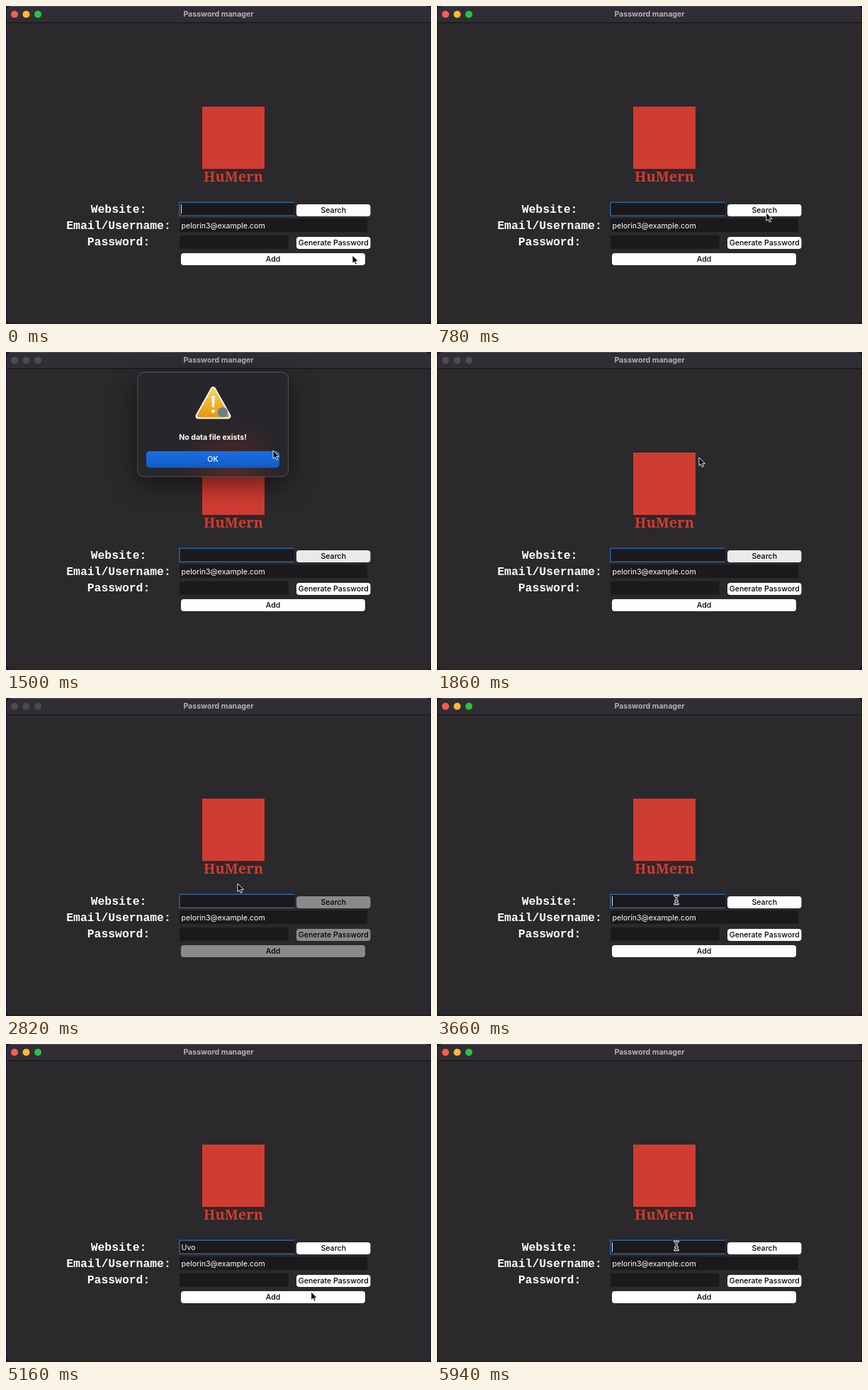
Write an HTML page that moves like this. It is 600x449 px and loops after 6000 ms.

```html
<!DOCTYPE html>
<html lang="en">
<head>
<meta charset="utf-8">
<title>Password manager</title>
<style>
  html, body { margin: 0; width: 100%; height: 100%; overflow: hidden; background: #1b1236; }
  svg { display: block; width: 600px; height: 449px; }
  text { font: 10.6px Inter, sans-serif; fill: #fff; }
  .mid { text-anchor: middle; }
  .bold { font-weight: 700; }
  .label { font: bold 16.4px "Liberation Mono", monospace; text-anchor: middle; }
  .brand { font: 800 20px "Noto Serif", serif; fill: #cf3c32; text-anchor: middle; }
  .field { fill: #1b191b; }
  .btn text { fill: #000; font-weight: 500; text-anchor: middle; }
  .panel { filter: drop-shadow(0 10px 18px rgba(0, 0, 0, .55)); }
</style>
</head>
<body>
<svg viewBox="0 0 600 449">
  <defs>
    <linearGradient id="amber" x2="0" y2="1">
      <stop stop-color="#fad04c"/><stop offset="1" stop-color="#e39a12"/>
    </linearGradient>
    <linearGradient id="blue" x2="0" y2="1">
      <stop stop-color="#1b6ee0"/><stop offset="1" stop-color="#105cc6"/>
    </linearGradient>
    <radialGradient id="glow" gradientUnits="userSpaceOnUse" cx="318" cy="166" r="72">
      <stop stop-color="#a02c26" stop-opacity=".36"/><stop offset="1" stop-color="#a02c26" stop-opacity="0"/>
    </radialGradient>
  </defs>

  <rect x="1" width="598.5" height="448.5" rx="7" fill="#2b292b"/>
  <path d="M1 23V7Q1 0 8 0H592.500Q599.500 0 599.500 7V23Z" fill="#302e34"/>
  <path d="M7 .5H593" stroke="#56545a"/>
  <path d="M1 23.500H599.500" stroke="#131214"/>
  <g id="lights"></g>
  <text class="mid bold" x="300" y="14.800" style="fill:#b3b1b5">Password manager</text>

  <rect x="277" y="142" width="88" height="88" fill="#cf3c32"/>
  <text class="brand" x="321" y="248">HuMern</text>

  <text class="label" x="159" y="292">Website:</text>
  <text class="label" x="159" y="315">Email/Username:</text>
  <text class="label" x="159" y="338">Password:</text>

  <rect class="field" x="245" y="277" width="162" height="19.500"/>
  <path d="M407 277.200H244.800V296.300H407" fill="none" stroke="#2c6298" stroke-width="1.500"/>
  <rect class="field" x="245" y="300" width="265" height="19"/>
  <rect class="field" x="245" y="324" width="153.500" height="18.500"/>
  <text id="site" x="247.500" y="290.800"></text>
  <rect id="caret" y="280" width="1" height="13.500" fill="#e8eef6"/>
  <text x="247.500" y="313.800">pelorin3@example.com</text>
  <g id="buttons"></g>

  <g id="dialog">
    <rect class="panel" x="186" y="28.500" width="212.500" height="147.500" rx="9" fill="#27262a"/>
    <rect x="186" y="28.500" width="212.500" height="147.500" rx="9" fill="url(#glow)" stroke="#5a585d" stroke-width=".9"/>
    <path d="M292.500 53L313.500 90.500H271.500Z" fill="#f1f0ee" stroke="#f1f0ee" stroke-width="8" stroke-linejoin="round"/>
    <path d="M292.500 53.500L312.800 90H272.200Z" fill="url(#amber)" stroke="url(#amber)" stroke-width="4.500" stroke-linejoin="round"/>
    <path d="M290.200 62H294.800L293.800 78H291.200Z" fill="#fff"/>
    <circle cx="292.500" cy="83.500" r="2.300" fill="#fff"/>
    <circle cx="306" cy="85" r="7" fill="#67808e"/>
    <text class="mid bold" x="292" y="124">No data file exists!</text>
    <rect x="198" y="140" width="188" height="23.500" rx="5" fill="url(#blue)"/>
    <text class="mid" x="292" y="155.300" style="font-weight:500">OK</text>
  </g>

  <g id="pointer">
    <path id="arrow" d="M0 0V11.500L2.700 9.100L4.500 13.200L6.500 12.300L4.700 8.400H8.400Z" fill="#000" stroke="#fff" stroke-width=".9" stroke-linejoin="round"/>
    <g id="ibeam" fill="none" stroke-linecap="round">
      <path id="beam" d="M-2.500 -6Q0 -6 0 -4.500Q0 -6 2.500 -6M0 -4.500V4.500M-2.500 6Q0 6 0 4.500Q0 6 2.500 6M-1.500 2H1.500" stroke="#fff" stroke-width="2.800"/>
      <use href="#beam" id="core"/>
      <path d="M-2.500 -6Q0 -6 0 -4.500Q0 -6 2.500 -6M0 -4.500V4.500M-2.500 6Q0 6 0 4.500Q0 6 2.500 6M-1.500 2H1.500" stroke="#000"/>
    </g>
  </g>
</svg>
<script>
const LOOP = 6000, STEP = 60;
const $ = id => document.getElementById(id);

function add(parent, tag, attrs, text = '') {
  const el = document.createElementNS('http://www.w3.org/2000/svg', tag);
  for (const key in attrs) el.setAttribute(key, attrs[key]);
  el.textContent = text;
  parent.append(el);
  return el;
}

function button(label, x, y, width) {
  const g = add($('buttons'), 'g', { class: 'btn' });
  const face = add(g, 'rect', { x, y, width, height: 17, rx: 4 });
  add(g, 'text', { x: x + width / 2, y: y + 12 }, label);
  return face;
}

const LIGHTS = ['#ff5b53', '#fdbb2e', '#27c53f'];
const lights = LIGHTS.map((_, i) => add($('lights'), 'circle', { cx: 12 + 16.5 * i, cy: 11.8, r: 5 }));
const search = button('Search', 410, 280, 104.5);
const others = [button('Generate Password', 410, 326, 104.5), button('Add', 247, 349, 260)];
$('core').remove();

// time, x, y
const PATH = [
  [120, 489, 352], [420, 482, 322], [720, 465, 292], [1080, 464, 292], [1260, 424, 210],
  [1500, 377, 139], [1620, 370, 149], [1920, 370, 149], [2340, 348, 210], [2700, 328, 258],
  [2820, 327, 262], [3120, 338, 282], [3360, 338, 285], [4140, 338, 285], [4320, 420, 306],
  [4440, 465, 323], [4680, 463, 334], [5040, 440, 346], [5340, 417, 356], [5400, 417, 356],
  [5640, 366, 309], [5820, 338, 285]
];
// time, scale, opacity
const DIALOG = [
  [900, 1.3, 0], [960, 1.22, .35], [1020, 1.137, .72], [1080, 1.04, .92], [1140, 1, 1],
  [1560, 1, 1], [1740, 1, 0]
];
const TYPED = [
  [0, ''], [3900, 'U'], [4020, 'Uv'], [4140, 'Uvo'], [5640, 'Uv'], [5700, 'U'], [5760, '']
];

function track(rows, t) {
  const i = rows.findIndex(r => r[0] > t);
  if (i === 0) return rows[0].slice(1);
  if (i < 0) return rows[rows.length - 1].slice(1);
  const a = rows[i - 1], b = rows[i], k = (t - a[0]) / (b[0] - a[0]);
  return a.slice(1).map((v, j) => v + (b[j + 1] - v) * k);
}

const show = (el, on) => { el.style.display = on ? '' : 'none'; };
const within = (x, y, l, t, r, b) => x > l && x < r && y > t && y < b;

function render(t) {
  const active = t < 900 || t >= 3480;
  lights.forEach((el, i) => el.setAttribute('fill', active ? LIGHTS[i] : '#4d4b50'));

  const dim = t >= 1980 && t < 3480;
  const pressed = t >= 840 && t < 1980;
  search.setAttribute('fill', dim ? '#8b898b' : pressed ? '#ebeaeb' : '#fff');
  others.forEach(el => el.setAttribute('fill', dim ? '#8b898b' : '#fff'));

  const site = $('site');
  site.textContent = TYPED.filter(r => r[0] <= t).pop()[1];
  const end = site.textContent ? site.getComputedTextLength() : 0;
  $('caret').setAttribute('x', 247 + end);
  show($('caret'), active && t % 900 < 600);

  const [scale, opacity] = track(DIALOG, t);
  show($('dialog'), opacity > 0);
  $('dialog').setAttribute('opacity', opacity);
  $('dialog').setAttribute('transform', `translate(292 102) scale(${scale}) translate(-292 -102)`);

  const [x, y] = track(PATH, t);
  const text = within(x, y, 245, 277, 407, 296) || within(x, y, 245, 300, 510, 319);
  show($('ibeam'), text);
  show($('arrow'), !text);
  $('pointer').setAttribute('transform', `translate(${x} ${y})`);
}

const start = performance.now();
function tick() {
  const t = (performance.now() - start) % LOOP;
  render(Math.floor(t / STEP) * STEP);
  requestAnimationFrame(tick);
}
tick();
</script>
</body>
</html>
```
